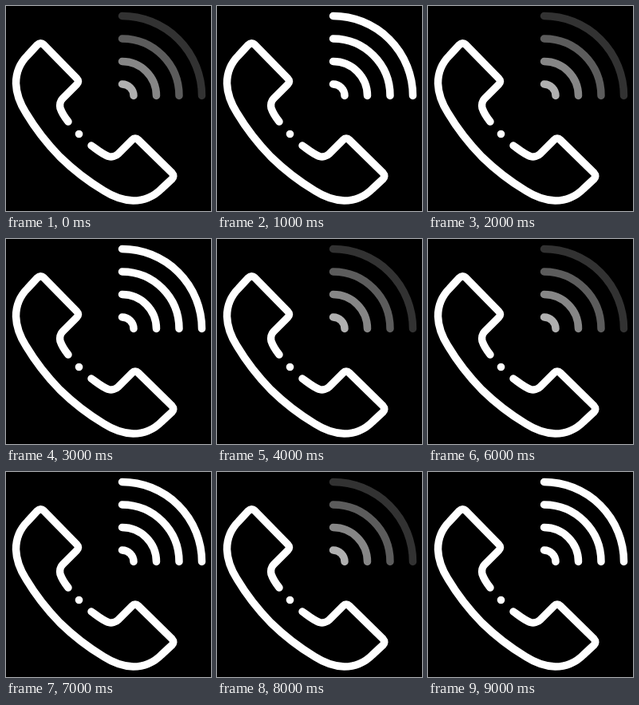
Recreate the animation shown at these times as an HTML page with a canvas. Size 257 by 257 pixels, loop 10 s.

```html
<!DOCTYPE html>
<html lang="en">
<head>
<meta charset="utf-8">
<title>Ringing phone</title>
<style>
html, body { margin: 0; width: 100%; height: 100%; overflow: hidden; background: #000; }
canvas { display: block; width: 257px; height: 257px; }
</style>
</head>
<body>
<canvas id="stage" width="257" height="257"></canvas>
<script>
const ctx = document.getElementById('stage').getContext('2d');

const HANDSET = new Path2D(`
  M78 145 C74 140 70 134 68 128 C67 124 68 119 71 116
  L88.5 98.5 Q92.5 94.5 88.5 90.5 L47.3 48.5 Q43.3 44.7 39.2 48.8 L27 62
  C17 72 12.5 83 12.5 97 C13 112 18 123 25 134
  C37 154 50 171 67.5 189 C85.5 206.5 102.5 219.5 122.5 231.5
  C133.5 238.5 144.5 243.5 159.5 244 C173.5 244 184.5 239.5 194.5 229.5
  L207.7 217.3 Q211.8 213.2 208 209.2 L166 168
  Q162 164 158 168 L140.5 185.5
  C137.5 188.5 132.5 189.5 128.5 188.5 C121 186 114 180 107 175`);

const RADII = [14.5, 43, 71.5, 100];
const HOLD = 1000; // ms in each state

function draw(ms) {
  const bright = Math.floor(ms / HOLD) % 2 === 1;
  ctx.fillStyle = '#000';
  ctx.fillRect(0, 0, 257, 257);
  ctx.lineWidth = 9.5;
  ctx.lineCap = ctx.lineJoin = 'round';

  // When dim, the waves fade with distance.
  RADII.forEach((radius, i) => {
    const alpha = bright ? 1 : 0.69 - 0.165 * i;
    ctx.strokeStyle = `rgba(255, 255, 255, ${alpha})`;
    ctx.beginPath();
    ctx.arc(145.5, 112.5, radius, -Math.PI / 2, 0);
    ctx.stroke();
  });

  ctx.strokeStyle = ctx.fillStyle = '#fff';
  ctx.stroke(HANDSET);
  ctx.beginPath();
  ctx.arc(91.5, 160.5, 4.8, 0, Math.PI * 2);
  ctx.fill();
}

function tick() {
  draw(performance.now() % 10000);
  requestAnimationFrame(tick);
}
tick();
</script>
</body>
</html>
```
